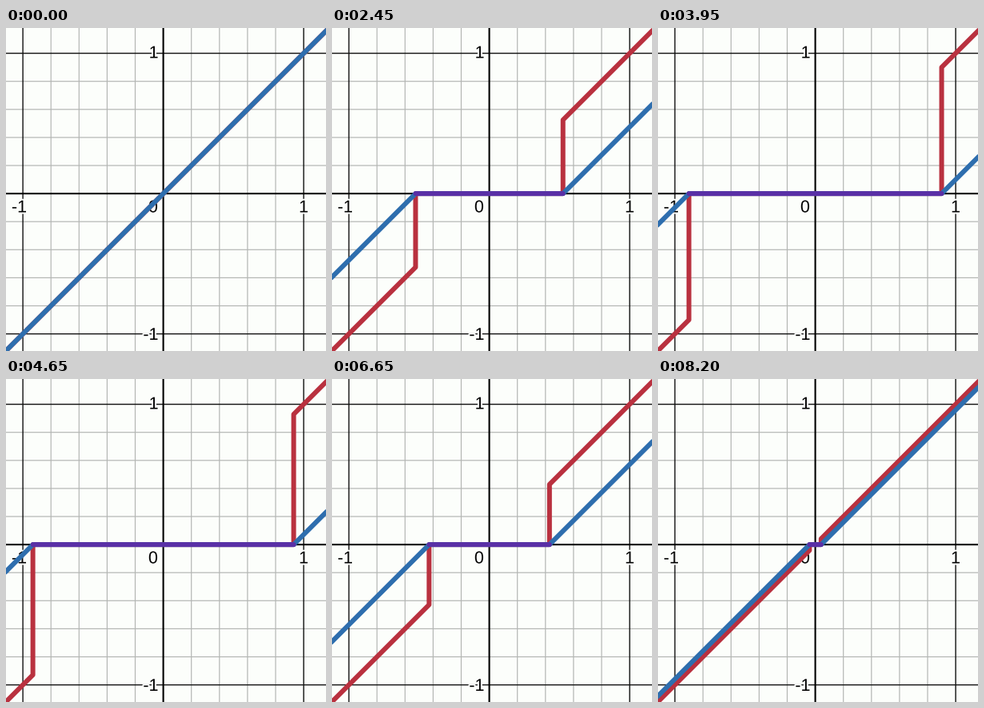
Write a matplotlib script that moves like this. It is 400x404 px and loops after 8.25 s.

```python
import matplotlib.pyplot as plt
import matplotlib.patheffects as pe
from matplotlib.animation import FuncAnimation

W, H, DPI = 400, 404, 100
PX = 72 / DPI                      # points per pixel
X0, Y0, UNIT = 196.6, 207.1, 175.5   # origin and scale in pixels
PAPER = "#fcfefb"
RED, BLUE, PURPLE = "#b9313f", "#2e6eae", "#5a30a6"

FRAMES, INTERVAL = 165, 50
START, PEAK, STEP = 7, 87.3, 0.0125

plt.rcParams["font.family"] = "Liberation Sans"
fig = plt.figure(figsize=(W / DPI, H / DPI), dpi=DPI, facecolor=PAPER)
ax = fig.add_axes([0, 0, 1, 1])
ax.set_xlim(0, W)
ax.set_ylim(H, 0)
ax.axis("off")


def to_px(xs, ys):
    return [X0 + UNIT * x for x in xs], [Y0 - UNIT * y for y in ys]


def grid_line(k, color, width):
    offset = k * UNIT / 5
    style = dict(color=color, lw=width * PX, zorder=1 + width, snap=False)
    ax.axvline(X0 + offset, **style)
    ax.axhline(Y0 - offset, **style)


def label(text, x, baseline, align="center"):
    halo = pe.withStroke(linewidth=4 * PX, foreground=PAPER)
    ax.text(x, baseline, text, fontsize=21.5 * PX, color="black", ha=align,
            va="baseline", zorder=5, path_effects=[halo])


def curve(color, zorder):
    line, = ax.plot([], [], color=color, lw=6 * PX, zorder=zorder, snap=False,
                    solid_capstyle="round", solid_joinstyle="round")
    return line


for k in range(-5, 6):
    if k == 0:
        grid_line(k, "black", 2.1)
    elif k % 5 == 0:
        grid_line(k, "#111111", 1.4)
    else:
        grid_line(k, "#b4b6b4", 1.2)

label("-1", 16.5, 230.5)
label("0", 184, 230.5)
label("1", 372, 230.5)
label("1", 190.5, 37.5, "right")
label("-1", 190.5, 390, "right")

hard = curve(RED, 6)
soft = curve(BLUE, 7)
flat = curve(PURPLE, 8)


def threshold(i):
    """Rises evenly from 0 to 1, then falls back."""
    rise = (i - START) * STEP
    fall = 1 - (i - PEAK) * STEP
    return max(0, min(rise, fall, 1))


def draw(i):
    t = threshold(i)
    hard.set_data(*to_px([-2, -t, -t, t, t, 2], [-2, -t, 0, 0, t, 2]))
    soft.set_data(*to_px([-2, -t, t, 2], [t - 2, 0, 0, 2 - t]))
    flat.set_data(*to_px([-t, t], [0, 0]))
    flat.set_visible(t > 0)
    return hard, soft, flat


anim = FuncAnimation(fig, draw, frames=FRAMES, interval=INTERVAL,
                     repeat=True, repeat_delay=0)
plt.show()
```
